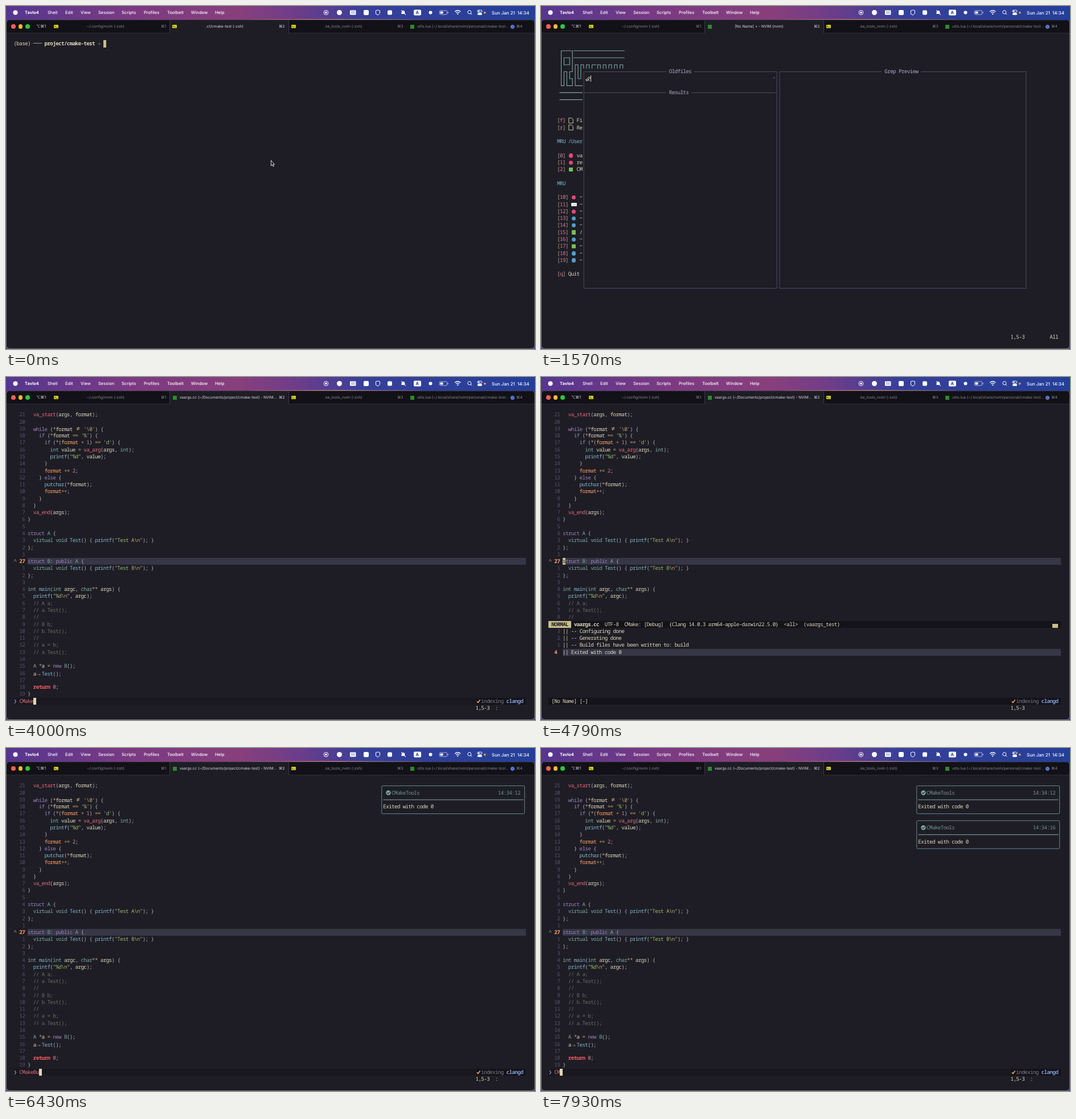
Animation of 929 by 603 pixels, one loop 8000 ms. Source, as an HTML page:

```html
<!DOCTYPE html>
<html lang="en">
<head>
<meta charset="utf-8">
<title>Terminal session</title>
<style>
html, body { margin: 0; width: 929px; height: 603px; overflow: hidden; background: #3a2c5c; }
#stage { position: relative; width: 929px; height: 603px; overflow: hidden;
  background: linear-gradient(90deg, #553690, #7c3a82 24%, #883f7c 44%, #6d3d8a 55%, #36409a 68%, #243f9a); }
#stage * { box-sizing: border-box; }
.layer, svg { position: absolute; left: 0; top: 0; width: 929px; height: 603px; }
.box { position: absolute; }
.ui { position: absolute; white-space: pre; font-family: Inter, sans-serif; text-rendering: geometricPrecision; line-height: 12px; }
.menu { color: #fff; font-size: 7.5px; font-weight: 500; top: 5.5px; }
.tab { color: #8b8a92; font-size: 6.6px; top: 30.3px; }
.tab.on { color: #dddde2; }
#win { position: absolute; left: 0; top: 24px; width: 929px; height: 578.5px; background: #1e1d25;
  border: 1px solid #77767f; border-top-color: #3c3b44; border-radius: 6px; overflow: hidden; }
.c { position: absolute; white-space: pre; height: 12.276px; line-height: 12.276px; color: #dcd7ba;
  font-family: "Noto Sans Mono", "DejaVu Sans Mono", monospace; font-size: 9.3px; font-stretch: condensed;
  letter-spacing: var(--gap, -.66px); text-rendering: geometricPrecision; font-variant-ligatures: none; }
.b, .rt { font-weight: 700; }
.cm { color: #6c6b66; } .st { color: #98bb6c; } .kw { color: #957fb8; } .ty { color: #7aa89f; }
.rd { color: #e46876; } .rt { color: #ff5d62; } .fn { color: #7fb4ca; } .nu { color: #d27e99; }
.lg { display: inline-block; width: 9.832px; text-align: center; color: #c0a36e; letter-spacing: 0; font-size: 12px; }
.op { color: #c0a36e; } .pu { color: #a9abc0; } .or { color: #ffa066; }
.bl { color: #7e9cd8; } .ln { color: #54546d; } .dk { color: #1e1d25; } .gy { color: #7c7b86; }
.tl { color: #6a9589; } .cy { color: #7fb4ca; }
</style>
</head>
<body>
<div id="stage"></div>
<script>
const LOOP = 8000, X0 = 13.4, Y0 = 60.3, CW = 4.916, RH = 12.276;
const BG = '#1e1d25', BAR = '#141319', KHAKI = '#c8bd8b', LINE = '#363646';
const stage = document.getElementById('stage');
const colX = c => X0 + c * CW, rowY = r => Y0 + r * RH;
const esc = s => s.replace(/&/g, '&amp;').replace(/</g, '&lt;');

function add(parent, cls, css = '', html = '') {
  const el = document.createElement('div');
  el.className = cls;
  el.style.cssText = css;
  el.innerHTML = html;
  parent.append(el);
  return el;
}
const layer = (parent = stage) => add(parent, 'layer');
const rect = (p, x, y, w, h, color, css = '') =>
  add(p, 'box', `left:${x}px;top:${y}px;width:${w}px;height:${h}px;background:${color};${css}`);
const cells = (p, r, c, n, color) => rect(p, colX(c), rowY(r), n * CW, RH, color);
const raw = (p, r, c, html, cls = '') => add(p, 'c ' + cls, `left:${colX(c)}px;top:${rowY(r)}px`, html);
const put = (p, r, c, text, cls) => raw(p, r, c, esc(text), cls);
const svg = (p, body) => p.insertAdjacentHTML('beforeend', `<svg viewBox="0 0 929 603" fill="none">${body}</svg>`);

// Fit the glyph pitch to the terminal grid.
const probe = add(stage, 'c', 'letter-spacing:0', '0'.repeat(100));
stage.style.setProperty('--gap', CW - probe.getBoundingClientRect().width / 100 + 'px');
probe.remove();

/* ---- syntax colours ---- */
const TOKENS = /(\/\/.*)|(".*?"|'.*?')|\b(while|if|else|struct|public|new)\b|\b(int|char|void|virtual|[AB])\b|\b(va_\w+)|\b(return)\b|(\w+)(?=\()|\b(\d+)\b|(!=|->)|([=+*]+)|([(){};,:])|(format(?= ?\+))/g;
const KINDS = ['cm', 'st', 'kw', 'ty', 'rd', 'rt', 'fn', 'nu', 'lg', 'op', 'pu', 'or'];
function paint(line) {
  return line.replace(TOKENS, (m, ...groups) => {
    const kind = KINDS[groups.findIndex(Boolean)];
    if (kind === 'lg') m = m === '!=' ? '≠' : '→';
    if (kind === 'st') m = m.replace(/\\./g, e => `<span class="op">${e}</span>`);
    return `<span class="${kind}">${m}</span>`;
  });
}
const CODE = String.raw`  va_start(args, format);

  while (*format != '\0') {
    if (*format == '%') {
      if (*(format + 1) == 'd') {
        int value = va_arg(args, int);
        printf("%d", value);
      }
      format += 2;
    } else {
      putchar(*format);
      format++;
    }
  }
  va_end(args);
}

struct A {
  virtual void Test() { printf("Test A\n"); }
};

struct B: public A {
  virtual void Test() { printf("Test B\n"); }
};

int main(int argc, char** args) {
  printf("%d\n", argc);
  // A a;
  // a.Test();
  //
  // B b;
  // b.Test();
  //
  // a = b;
  // a.Test();

  A *a = new B();
  a->Test();

  return 0;
}`.split('\n');

/* ---- menu bar ---- */
const MENU = [['Tavlo4', 33], ['Shell', 73], ['Edit', 104], ['View', 131], ['Session', 162], ['Scripts', 203],
  ['Profiles', 242], ['Toolbelt', 283], ['Window', 325], ['Help', 367]];
MENU.forEach(([name, x], i) => add(stage, 'ui menu', `left:${x}px;${i ? '' : 'font-weight:700'}`, name));
add(stage, 'ui menu', 'right:10px;font-size:7.9px', 'Sun Jan 21  14:34');
svg(stage, `<g fill="#fff">
  <circle cx="16.5" cy="11.5" r="4"/><circle cx="562" cy="11.5" r="1.8"/><circle cx="585.5" cy="11.5" r="4.5"/>
  <rect x="604" y="7.5" width="10.5" height="8" rx="1"/><rect x="628" y="7" width="9" height="9" rx="2"/>
  <rect x="670" y="7.5" width="8" height="8" rx="2"/><rect x="716" y="6.5" width="13" height="10" rx="2"/>
  <circle cx="745.5" cy="11.5" r="3"/><rect x="762.5" y="9.5" width="5" height="4" rx="1"/>
  <rect x="775.6" y="10" width="1.2" height="3" rx=".6" opacity=".6"/><circle cx="793.3" cy="14.2" r="1.1"/>
  <circle cx="830.3" cy="9" r="1.1"/><rect x="828" y="12" width="8" height="3.8" rx="1.9"/>
  <path d="M694.5 14V12Q694.5 8 697.5 8T700.5 12V14Z"/></g>
  <g stroke="#fff"><circle cx="562" cy="11.5" r="3.9"/><path d="M649.5 8L653 7L656.5 8V13L653 16L649.5 14Z"/>
  <path d="M694 7L702 16"/><rect x="761.2" y="8" width="13.4" height="7" rx="2" opacity=".6"/>
  <path d="M788.2 10Q793.3 5.6 798.4 10M790.4 12.2Q793.3 9.6 796.2 12.2" stroke-width="1.3"/>
  <circle cx="813.8" cy="10.8" r="3"/><path d="M816 13L818.2 15.2"/><rect x="828" y="7.2" width="8" height="3.6" rx="1.8"/></g>
  <path d="M606 10H613M606 12.5H613" stroke="#39439a" stroke-dasharray="1.2 .6"/>
  <circle cx="840.8" cy="11.7" r="1.9" fill="#f29a38"/>`);
add(stage, 'ui menu', 'left:719.6px;color:#2c3c8c;font-weight:700', 'A');
rect(stage, 430, 22.8, 300, 1, 'linear-gradient(90deg,#a34b6e,#e08a6c 50%,#5a4a98)');

/* ---- window and tabs ---- */
add(stage, '').id = 'win';
const tabs = layer();
rect(tabs, 1, 25, 287, 23, '#121117', 'border-radius:5px 0 0 0;border-right:1px solid #3b3a43;border-bottom:1px solid #2d2c34');
rect(tabs, 496, 25, 432, 23, '#121117', 'border-radius:0 5px 0 0;border-left:1px solid #3b3a43;border-bottom:1px solid #2d2c34');
['#ff5f57', '#febc2e', '#28c840'].forEach((c, i) =>
  rect(tabs, 9.2 + 12.4 * i, 32.2, 7.6, 7.6, c, 'border-radius:50%'));
const label = (x, text, cls = '', css = '') => add(tabs, 'ui tab ' + cls, `left:${x}px;${css}`, text);
const middle = (x, text, cls) => label(x, text, cls, 'transform:translateX(-50%)');
const termIcon = (p, x) => {
  rect(p, x, 33, 8, 6.4, '#d6c91f', 'border-radius:1px');
  svg(p, `<path d="M${x + 1.5} 34.6l1.5 1.4l-1.5 1.4M${x + 4} 37.6h2" stroke="#222" stroke-width=".8"/>`);
};
const leafIcon = (p, x) => rect(p, x, 32.6, 7, 7, '#2c8a2c');
label(53, '⌥⌘1', 'on', 'font-size:7px');
termIcon(tabs, 84);
middle(175, '~/.config/nvim (-zsh)');
termIcon(tabs, 500.5);
middle(591.5, '..ke_tools_nvim (-zsh)');
leafIcon(tabs, 710);
label(722, 'utils.lua (~/.local/share/nvim/personal/cmake-tool...');
[[272, 1], [479, 2], [687, 3], [896, 4]].forEach(([x, n]) => label(x, '⌘' + n, n === 2 ? 'on' : ''));
rect(tabs, 886, 32.5, 7, 7, '#4468d8', 'border-radius:50%;border:1px solid #7f97e6');
const title = middle(383, '', 'on');
const zshIcon = layer(), nvimIcon = layer();
termIcon(zshIcon, 292.3);
leafIcon(nvimIcon, 293);

/* ---- shell ---- */
const shell = layer();
raw(shell, 0, 0, '(base) ─── <span class="b">project/cmake-test</span> <span class="gy">»</span>');
const typed = put(shell, 0, 32, '');
const caret = cells(shell, 0, 32, 1, KHAKI);
const mouse = layer();
svg(mouse, '<path d="M465.5 271.5V281L467.6 279L469.1 282.2L470.4 281.6L469 278.5H471.6Z" fill="#111" stroke="#eee" stroke-width=".9"/>');

/* ---- start screen ---- */
const dash = layer();
const ARMS = { '─': 'EW', '│': 'NS', '┌': 'ES', '┐': 'SW', '└': 'NE', '┘': 'NW' };
const STEP = { N: `v${-RH / 2}`, S: `v${RH / 2}`, E: `h${CW / 2}`, W: `h${-CW / 2}` };
const RULE = '─'.repeat(18);
const BANNER = ['┌───┐' + RULE, '│┌─┐│' + RULE, '│└─┘│┌┐┌┐┌┐┌─┌┐┌┐┌┐┌┐┌┐', '│┌┐┌┘││││', '│││└┐│└┘│',
  '└┘└─┘└──┘', '─────' + RULE, '─────' + RULE];
let art = '';
BANNER.forEach((line, r) => [...line].forEach((ch, c) => {
  for (const arm of ARMS[ch]) art += `M${colX(c + 4.5)} ${rowY(r + 1.5)}${STEP[arm]}`;
}));
svg(dash, `<path d="${art}" stroke="#7aa89f" stroke-width="1.1" stroke-linecap="square"/>`);
const ICONS = {
  cc: ['#f0437a', '50%'], lua: ['#4f9fd0', '50%'], cmake: ['#74c24a', '1px'], md: ['#e8e8e8', '1px']
};
function entry(row, key, icon, text) {
  raw(dash, row, 3, `<span class="op">[</span><span class="nu">${key}</span><span class="op">]</span>`);
  const c = 5 + key.length + 1;
  if (ICONS[icon]) {
    const [color, round] = ICONS[icon];
    const wide = icon === 'md';
    rect(dash, colX(c) + (wide ? 0 : 1), rowY(row) + (wide ? 3.4 : 2.6), wide ? 9.8 : 7.4, wide ? 6 : 7.4, color, 'border-radius:' + round);
  } else if (icon) {
    svg(dash, `<path d="M${colX(c) + 1} ${rowY(row) + 1.5}h5l2.5 2.5v6.5h-7.5z" stroke="#dcd7ba" stroke-width=".9"/>`);
  }
  put(dash, row, icon ? c + 3 : c, text);
}
entry(11, 'f', 'file', 'Find File');
entry(12, 'r', 'file', 'Recent Files');
put(dash, 14, 3, 'MRU /Users/dev/Documents/project/cmake-test', 'cy');
entry(16, '0', 'cc', 'vaargs.cc');
entry(17, '1', 'cc', 'reverse.cc');
entry(18, '2', 'cmake', 'CMakeLists.txt');
put(dash, 20, 3, 'MRU', 'cy');
'cc md cc lua lua cmake lua cmake lua lua'.split(' ').forEach((kind, i) =>
  entry(22 + i, String(10 + i), kind, {
    cc: '~/Documents/project/cmake-test/main.cc', md: '~/Documents/notes/README.md',
    cmake: (i === 5 ? '/' : '~/') + 'Documents/project/CMakeLists.txt', lua: `~/.config/nvim/lua/plugin_${i}.lua`
  }[kind]));
entry(33, 'q', '', 'Quit');

/* ---- file picker ---- */
const picker = layer();
rect(picker, 73, 109.5, 782, 391, BG);
svg(picker, `<path d="M220 115.5H75.2V496.3H414.2V115.5H269M75.2 152.5H220M264 152.5H414.2M598 115.5H419.2V496.3H851.8V115.5H667" stroke="#4c4c60"/>
  <path d="M78.5 129.5L85 124.5L86.5 127L79.5 131ZM82.5 129L80.5 132.5M83 129L85 132" stroke="#dcd7ba"/>
  <path d="M87.5 122V133" stroke="#dcd7ba"/>`);
put(picker, 4, 43, 'Oldfiles', 'pu');
put(picker, 7, 43, 'Results', 'pu');
put(picker, 4, 120, 'Grep Preview', 'pu');
put(picker, 5, 80, '*', 'ln');
const found = layer(picker);
cells(found, 8, 13, 68, LINE);
['> vaargs.cc', '  reverse.cc', '  CMakeLists.txt'].forEach((s, i) => put(found, 8 + i, 13, s));
CODE.slice(0, 30).forEach((s, i) => raw(found, 5 + i, 84, paint(s)));

/* ---- editor ---- */
const editor = layer();
cells(editor, 21, 5, 178, LINE);
CODE.forEach((s, r) => {
  if (r !== 21) put(editor, r, 2, String(r < 21 ? 21 - r : r - 21).padStart(2), 'ln');
  raw(editor, r, 5, paint(s));
});
put(editor, 21, 2, '27', 'or b');
const signLow = layer(editor), signHere = layer(editor), block = layer(editor);
cells(signLow, 26, 2, 2, BG);
put(signLow, 26, 3, '5', 'or b');
put(signLow, 26, 0, '^', 'op');
put(signHere, 21, 0, '^', 'op');
cells(block, 21, 5, 1, KHAKI);
put(block, 21, 5, 's', 'dk');

function statusLine(p, row) {
  cells(p, row, 0, 183, BAR);
  cells(p, row, 0, 8, KHAKI);
  put(p, row, 1, 'NORMAL', 'dk b');
  put(p, row, 9, 'vaargs.cc', 'b');
  put(p, row, 20, 'UTF-8');
  put(p, row, 27, 'CMake: [Debug]');
  put(p, row, 43, '{Clang 14.0.3 arm64-apple-darwin22.5.0}');
  put(p, row, 84, '<all>');
  put(p, row, 91, '(vaargs_test)');
  rect(p, colX(180), rowY(row) + 5, 2 * CW, 7.3, KHAKI);
}
statusLine(editor, 41);

/* ---- build output ---- */
function outputPane(lines) {
  const p = layer();
  rect(p, 12, rowY(30), 902, 12 * RH, BG);
  statusLine(p, 30);
  lines.forEach((s, i) => {
    const last = i === lines.length - 1, row = 31 + i;
    if (last) cells(p, row, 5, 178, LINE);
    put(p, row, last ? 2 : 3, String(last ? i + 1 : lines.length - 1 - i), last ? 'or b' : 'ln');
    put(p, row, 5, '|| ' + s);
  });
  cells(p, 41, 0, 183, BAR);
  put(p, 41, 1, '[No Name] [-]');
  return p;
}
const generated = outputPane(['-- Configuring done', '-- Generating done',
  '-- Build files have been written to: build', 'Exited with code 0']);
const built = outputPane(['[ 50%] Built target vaargs_test', '[100%] Built target reverse', 'Exited with code 0']);

/* ---- notifications ---- */
function notice(row, time) {
  const p = layer();
  const shade = rect(p, colX(132), rowY(row + 1), 50 * CW, 3 * RH, '#08080a');
  const body = layer(p);
  const y = rowY(row) + RH / 2;
  svg(body, `<rect x="659.8" y="${y}" width="250.9" height="${4 * RH}" rx="1.5" stroke="#64878e"/>
    <path d="M662.3 ${y + 2 * RH}H908.5" stroke="#86aca6"/>
    <circle cx="671.5" cy="${y + RH}" r="4.2" fill="#7aa89f"/>
    <path d="M669.3 ${y + RH}l1.7 1.7l3-3.2" stroke="${BG}" stroke-width="1.1"/>`);
  put(body, row + 1, 135, 'CMakeTools', 'tl');
  put(body, row + 1, 173, time, 'tl');
  put(body, row + 3, 132, 'Exited with code 0');
  return (t, from) => {
    const k = Math.min(1, Math.max(0, (t - from) / 280));
    show(p, t >= from);
    shade.style.opacity = 1 - k;
    body.style.opacity = .2 + .8 * k;
  };
}
const first = notice(0, '14:34:12'), second = notice(5, '14:34:16');

/* ---- command line and ruler ---- */
const prompt = layer();
cells(prompt, 41, 0, 183, '#19181f');
put(prompt, 41, 0, '❯', 'bl');
put(prompt, 42, 172, ':');
const command = put(prompt, 41, 2, '', 'rd');
const promptCaret = cells(prompt, 41, 2, 1, '#dcd7ba');
const indexing = layer();
cells(indexing, 41, 165, 18, BAR);
svg(indexing, '<path d="M827 570.2L829 572.4L832.6 567.4" stroke="#ffa066" stroke-width="1.6"/>');
put(indexing, 41, 167, 'indexing', 'gy');
put(indexing, 41, 176, 'clangd', 'bl b');
const ruler = layer(), all = layer();
put(ruler, 42, 165, '1,5-3');
put(all, 42, 179, 'All');

/* ---- timeline ---- */
const SHELL_KEYS = [[70, 'n'], [140, 'nv'], [220, 'nvi'], [290, 'nvim']];
const GEN = 'CMakeGenerate', MAKE = 'CMakeBuild';
// [time, command, letters shown]; no command means normal mode.
const KEYS = [[2290, GEN, 0], [2430, GEN, 1], [2640, GEN, 2], [2790, GEN, 3], [2930, GEN, 4], [3000, GEN, 5],
  [4070, GEN, 6], [4210, GEN, 7], [4290, GEN, 8], [4360, GEN, 9], [4500, GEN, 13], [4710],
  [5500, MAKE, 0], [5640, MAKE, 1], [5710, MAKE, 2], [5930, MAKE, 3], [6000, MAKE, 4], [6070, MAKE, 5],
  [6290, MAKE, 6], [6430, MAKE, 7], [6570, MAKE, 8], [6710, MAKE, 9], [6790, MAKE, 10], [7000],
  [7500, MAKE, 0], [7640, MAKE, 1], [7860, MAKE, 2]];
const at = (steps, t) => steps.filter(s => s[0] <= t).pop() || [];
const show = (el, on) => { el.style.visibility = on ? 'visible' : 'hidden'; };
const within = (t, a, b) => t >= a && t < b;
const setText = (el, s) => { if (el.textContent !== s) el.textContent = s; };

function draw(t) {
  const word = at(SHELL_KEYS, t)[1] || '';
  setText(typed, word);
  caret.style.left = colX(32 + word.length) + 'px';
  for (const el of [shell, zshIcon]) el.style.display = t < 430 ? '' : 'none';
  show(nvimIcon, t >= 430);
  show(mouse, t < 70);
  setText(title, t < 430 ? '..ct/cmake-test (-zsh)' : t < 1860 ? '[No Name] + - NVIM (nvim)'
    : 'vaargs.cc (~/Documents/project/cmake-test) - NVIM...');
  title.style.left = (t < 1860 ? 383 : 390) + 'px';

  const open = t >= 1860, settled = t >= 2290;
  dash.style.display = within(t, 570, 1860) ? '' : 'none';
  picker.style.display = within(t, 1210, 1860) ? '' : 'none';
  found.style.display = t >= 1640 ? '' : 'none';
  editor.style.display = open ? '' : 'none';
  show(ruler, t >= 570);
  show(all, within(t, 1570, 2290));

  const [, text, count] = at(KEYS, t);
  const asking = text !== undefined;
  show(signLow, open && !settled);
  show(signHere, settled);
  show(block, open && !asking);
  prompt.style.display = asking ? '' : 'none';
  if (asking) {
    setText(command, text.slice(0, count));
    promptCaret.style.left = colX(2 + count) + 'px';
  }
  show(indexing, settled);
  generated.style.display = within(t, 4780, 5290) ? '' : 'none';
  built.style.display = within(t, 7070, 7430) ? '' : 'none';
  first(t, 4930);
  second(t, 7070);
}

const start = performance.now();
function tick() {
  draw((performance.now() - start) % LOOP);
  requestAnimationFrame(tick);
}
tick();
</script>
</body>
</html>
```
